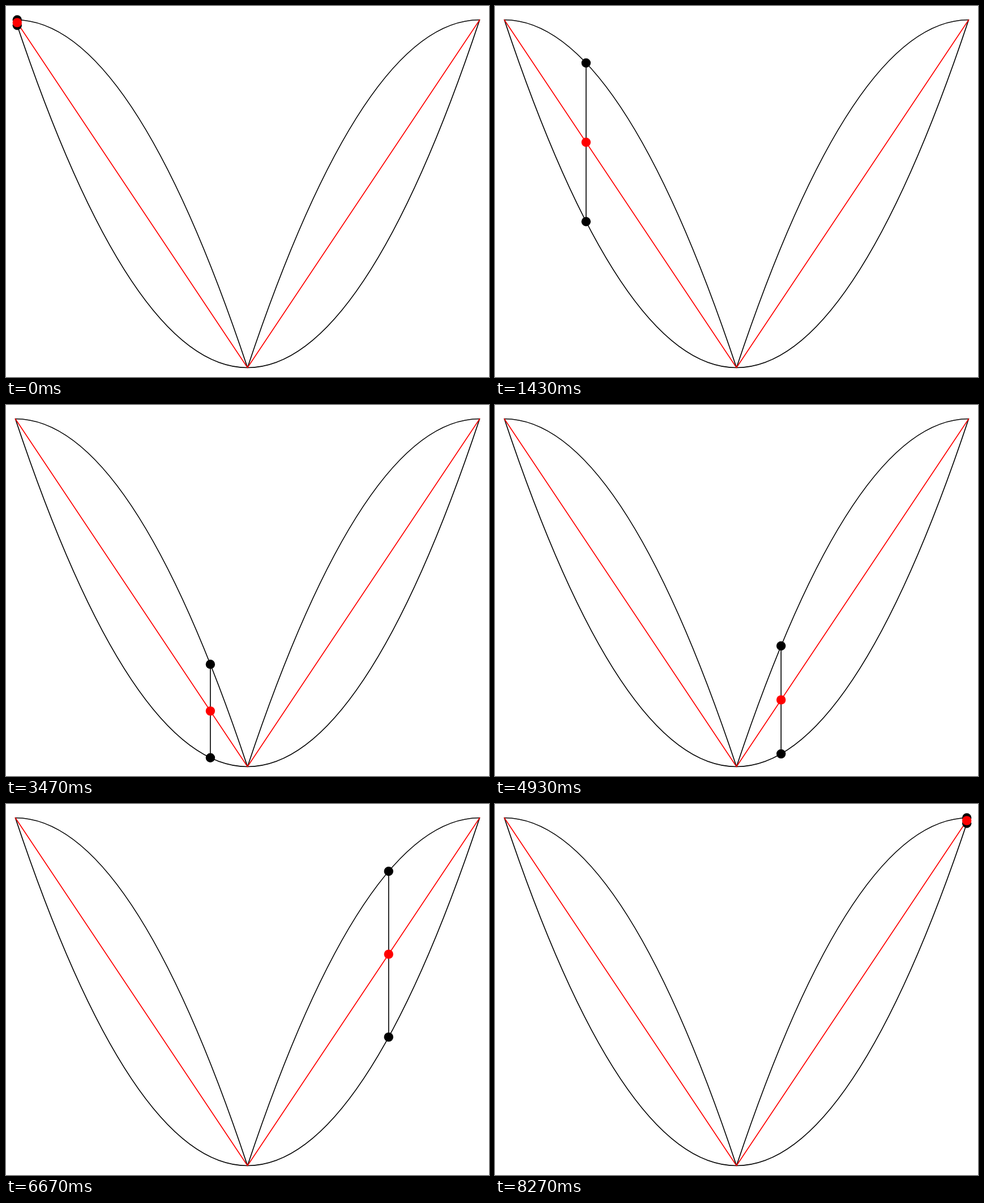
Write an HTML page with a canvas that moves like this. It is 853 px wide and 656 px high and loops after 8310 ms.

```html
<!DOCTYPE html>
<html lang="en">
<head>
<meta charset="utf-8">
<title>Midpoint of two curves</title>
<style>
  html, body { margin: 0; width: 100%; height: 100%; overflow: hidden; background: #fff; }
  canvas { display: block; }
</style>
</head>
<body>
<canvas id="stage" width="853" height="656"></canvas>
<script>
const ctx = document.getElementById('stage').getContext('2d');
const LOOP = 8310, STEPS = 249;
const LEFT = 16.5, TOP = 24.5, HALF = 410, HEIGHT = 615;
const MID = LEFT + HALF, RIGHT = MID + HALF, BOTTOM = TOP + HEIGHT;
const DOT = 8.2;

// Steps run at 30 per second, with start times rounded to 10 ms.
const stepStart = n => Math.round(n * 10 / 3) * 10;

function stepAt(ms) {
  let n = Math.min(STEPS - 1, Math.floor(ms * 0.03) + 1);
  while (n > 0 && stepStart(n) > ms) n--;
  return n;
}

function stroke(color, trace) {
  ctx.strokeStyle = color;
  ctx.beginPath();
  trace();
  ctx.stroke();
}

function dot(color, x, y) {
  ctx.fillStyle = color;
  ctx.beginPath();
  ctx.arc(x, y, DOT, 0, Math.PI * 2);
  ctx.fill();
}

function drawCurves() {
  stroke('#000', () => {
    ctx.moveTo(LEFT, TOP);
    ctx.quadraticCurveTo(MID, TOP + 2 * HEIGHT, RIGHT, TOP);
  });
  stroke('#000', () => {
    ctx.moveTo(LEFT, TOP);
    ctx.quadraticCurveTo(LEFT + HALF / 2, TOP, MID, BOTTOM);
    ctx.quadraticCurveTo(RIGHT - HALF / 2, TOP, RIGHT, TOP);
  });
  stroke('#f00', () => {
    ctx.moveTo(LEFT, TOP);
    ctx.lineTo(MID, BOTTOM);
    ctx.lineTo(RIGHT, TOP);
  });
}

function drawMarker(n) {
  const u = (n + 1) / 125;
  const d = 1 - Math.abs(u - 1);
  const x = LEFT + HALF * u;
  const upper = TOP + HEIGHT * d * d;
  const lower = TOP + HEIGHT * d * (2 - d);
  stroke('#000', () => {
    ctx.moveTo(x, upper);
    ctx.lineTo(x, lower);
  });
  dot('#000', x, upper);
  dot('#000', x, lower);
  dot('#f00', x, (upper + lower) / 2);
}

function draw(ms) {
  ctx.fillStyle = '#fff';
  ctx.fillRect(0, 0, 853, 656);
  ctx.lineWidth = 1.64;
  ctx.lineCap = ctx.lineJoin = 'round';
  drawCurves();
  drawMarker(stepAt(ms));
}

const start = performance.now();
function tick() {
  draw((performance.now() - start) % LOOP);
  requestAnimationFrame(tick);
}
tick();
</script>
</body>
</html>
```
